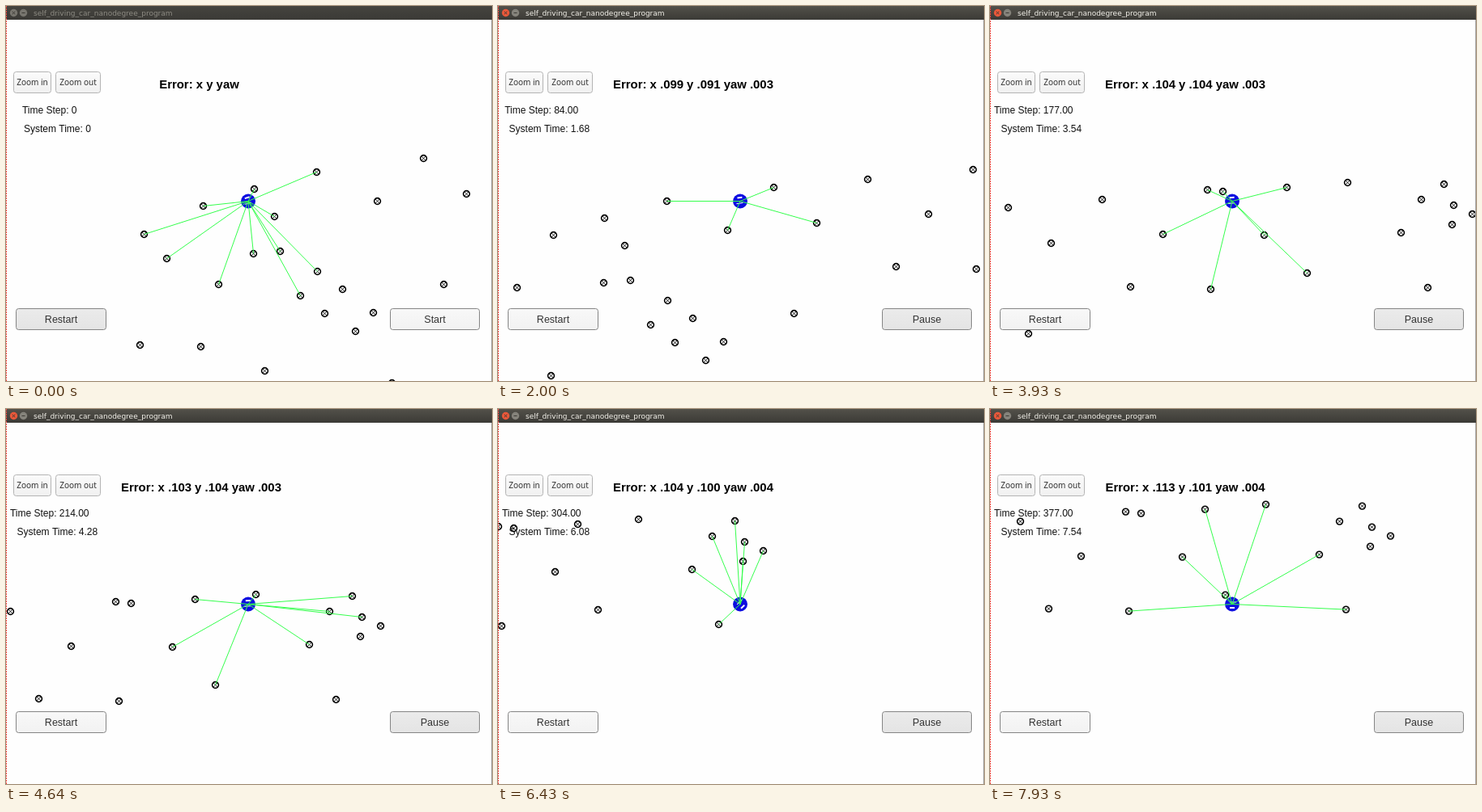
Write an HTML page with a canvas that moves like this. It is 600 px wide and 464 px high and loops after 8000 ms.

```html
<!DOCTYPE html>
<html lang="en">
<head>
<meta charset="utf-8">
<title>Localization simulator</title>
<style>
html, body { margin: 0; width: 100%; height: 100%; overflow: hidden; background: #fefefe; }
canvas { display: block; }
</style>
</head>
<body>
<canvas id="stage" width="600" height="464"></canvas>
<script>
const ctx = document.getElementById('stage').getContext('2d');
const LOOP = 8000, FPS = 14, START = 5, RANGE = 142;
const CAR = { x: 299, y: 241.5 };
const SANS = '"Liberation Sans", Arial, sans-serif';

// World positions of the landmarks, as seen with the camera at rest.
const landmarks = [
  [515, 188], [568, 232], [458, 241], [383, 205], [306, 226], [243, 247],
  [331, 260], [170, 282], [198, 312], [305, 306], [338, 303], [262, 344],
  [384, 328], [363, 358], [415, 350], [540, 344], [393, 380], [453, 379],
  [431, 402], [165, 419], [240, 421], [319, 451], [476, 466],
  [761, 166], [631, 178], [706, 221], [666, 286], [765, 289],
  [780, 168], [859, 163], [934, 157], [1053, 159], [1025, 178], [1065, 185],
  [1088, 196], [1063, 209], [1000, 219], [831, 222], [884, 269], [1033, 287]
];

// tick, distance travelled in x and y
const route = [
  [5, 0, 0], [11, 28, -9], [28, 175, -36], [55, 493, -61], [65, 626, -72],
  [75, 729, -70], [90, 761, 21], [98, 707, 39], [111, 594, 39.4]
];

// tick, time step, error in x and y
const stats = [
  [5, 1, .07, .08], [11, 21, .074, .078], [28, 84, .099, .091],
  [55, 177, .104, .104], [75, 251, .103, .104], [90, 304, .104, .1],
  [111, 377, .113, .101]
];

function segment(keys, tick) {
  let i = 0;
  while (i < keys.length - 2 && tick >= keys[i + 1][0]) i++;
  return i;
}

function linear(keys, tick, col) {
  const i = segment(keys, tick), a = keys[i], b = keys[i + 1];
  return a[col] + (b[col] - a[col]) * (tick - a[0]) / (b[0] - a[0]);
}

function slope(keys, i, col) {
  const rate = j => (keys[j + 1][col] - keys[j][col]) / (keys[j + 1][0] - keys[j][0]);
  if (i === 0) return rate(0) * .8;
  if (i === keys.length - 1) return rate(i - 1);
  const before = keys[i][0] - keys[i - 1][0], after = keys[i + 1][0] - keys[i][0];
  return (rate(i - 1) * after + rate(i) * before) / (before + after);
}

function smooth(keys, tick, col) {
  const i = segment(keys, tick), a = keys[i], b = keys[i + 1];
  const span = b[0] - a[0], u = Math.max(0, Math.min(1, (tick - a[0]) / span));
  const u2 = u * u, u3 = u2 * u;
  return (2 * u3 - 3 * u2 + 1) * a[col] + (u3 - 2 * u2 + u) * span * slope(keys, i, col)
    + (3 * u2 - 2 * u3) * b[col] + (u3 - u2) * span * slope(keys, i + 1, col);
}

const place = tick => ({ x: smooth(route, tick, 1), y: smooth(route, tick, 2) });

function label(text, x, y, font, color = '#111', align = 'center') {
  ctx.font = font;
  ctx.fillStyle = color;
  ctx.textAlign = align;
  ctx.fillText(text, x, y);
}

function line(x1, y1, x2, y2) {
  ctx.beginPath();
  ctx.moveTo(x1, y1);
  ctx.lineTo(x2, y2);
  ctx.stroke();
}

function disc(x, y, r, color) {
  ctx.fillStyle = color;
  ctx.beginPath();
  ctx.arc(x, y, r, 0, Math.PI * 2);
  ctx.fill();
}

function button(x, y, w, h, top, bottom, border) {
  const fill = ctx.createLinearGradient(0, y, 0, y + h);
  fill.addColorStop(0, top);
  fill.addColorStop(1, bottom);
  ctx.fillStyle = fill;
  ctx.strokeStyle = border;
  ctx.lineWidth = 1;
  ctx.beginPath();
  ctx.roundRect(x + .5, y + .5, w - 1, h - 1, 3);
  ctx.fill();
  ctx.stroke();
}

function drawCar(angle) {
  ctx.save();
  ctx.translate(CAR.x, CAR.y);
  disc(0, 0, 9, '#0c0ce0');
  ctx.rotate(angle);
  ctx.strokeStyle = '#f4f4ff';
  ctx.lineWidth = 2;
  line(-3, -4.5, 3, -4.5);
  ctx.lineWidth = 1;
  line(-5, 2.5, 3, 2.5);
  ctx.restore();
}

function drawLandmark(x, y) {
  ctx.strokeStyle = '#000';
  ctx.lineWidth = 1.6;
  ctx.beginPath();
  ctx.arc(x, y, 3.9, 0, Math.PI * 2);
  ctx.stroke();
  ctx.lineWidth = .9;
  line(x - 2.5, y - 2.5, x + 2.5, y + 2.5);
  line(x - 2.5, y + 2.5, x + 2.5, y - 2.5);
}

function drawWorld(tick) {
  const pos = place(tick), next = place(tick + .5), prev = place(tick - .5);
  const heading = tick < START ? -.3 : Math.atan2(next.y - prev.y, next.x - prev.x);
  const seen = landmarks.map(([x, y]) => [x - pos.x + .5, y - pos.y + .5]);
  drawCar(heading);
  seen.forEach(([x, y]) => drawLandmark(x, y));
  ctx.strokeStyle = '#35ff4d';
  ctx.lineWidth = 1;
  for (const [x, y] of seen) {
    if (Math.hypot(x - CAR.x, y - CAR.y) < RANGE) line(CAR.x, CAR.y, x, y);
  }
}

function drawTitleBar(active) {
  const fill = ctx.createLinearGradient(0, 0, 0, 17);
  fill.addColorStop(0, active ? '#53514a' : '#45443f');
  fill.addColorStop(1, '#3b3a36');
  ctx.fillStyle = fill;
  ctx.fillRect(0, 0, 600, 17);
  disc(9.5, 8.5, 4.7, active ? '#e8583a' : '#77756e');
  disc(21.5, 8.5, 4.7, active ? '#85837b' : '#77756e');
  ctx.strokeStyle = '#3c3a35';
  ctx.lineWidth = 1;
  line(7.8, 6.8, 11.2, 10.2);
  line(7.8, 10.2, 11.2, 6.8);
  line(19.5, 8.5, 23.5, 8.5);
  label('self_driving_car_nanodegree_program', 34, 12, '9px "DejaVu Sans", sans-serif',
    active ? '#f3f1ea' : '#8d8b83', 'left');
}

function drawPanel(tick, running) {
  const step = Math.round(linear(stats, tick, 1));
  const err = col => linear(stats, tick, col).toFixed(3).slice(1);
  const yaw = tick > 80 ? '.004' : '.003';
  const small = '12px ' + SANS, big = '12.5px ' + SANS;
  const narrow = 'extra-condensed 10px "Noto Sans", "Open Sans", sans-serif';

  button(9, 81, 47, 27, '#fbfbfb', '#f0f0f0', '#b4b4b4');
  button(61, 81, 56, 27, '#fbfbfb', '#f0f0f0', '#b4b4b4');
  label('Zoom in', 32.5, 98, narrow, '#333');
  label('Zoom out', 89, 98, narrow, '#333');

  label(running ? `Error: x ${err(2)} y ${err(3)} yaw ${yaw}` : 'Error: x y yaw',
    running ? 241 : 238.5, 102, 'bold 14.9px ' + SANS, '#000');
  label('Time Step: ' + (running ? step.toFixed(2) : '0'), 53.7, 133, small);
  label('System Time: ' + (running ? (step * .02).toFixed(2) : '0'), 63.4, 156, small);

  const light = ['#f8f8f8', '#f2f2f2'], dark = ['#ebebeb', '#e4e4e4'];
  button(12, 374, 112, 27, ...(running ? light : dark), '#858585');
  button(474, 374, 111, 27, ...(running ? dark : light), '#858585');
  label('Restart', 68, 392, big, '#333');
  label(running ? 'Pause' : 'Start', 529.5, 392, big, '#333');
}

function drawEdges() {
  ctx.fillStyle = '#f04a42';
  for (let y = 0; y < 464; y += 3) ctx.fillRect(0, y, 1, 2);
  ctx.fillStyle = '#a9a9a9';
  ctx.fillRect(599, 17, 1, 447);
}

function draw() {
  const time = performance.now() % LOOP;
  const tick = Math.floor((time + 5) * FPS / 1000);
  const running = tick >= START;
  const shown = Math.max(START, Math.min(tick, 111));
  ctx.fillStyle = '#fefefe';
  ctx.fillRect(0, 0, 600, 464);
  drawWorld(running ? shown : 0);
  drawPanel(shown, running);
  drawTitleBar(running);
  drawEdges();
  requestAnimationFrame(draw);
}

draw();
</script>
</body>
</html>
```
